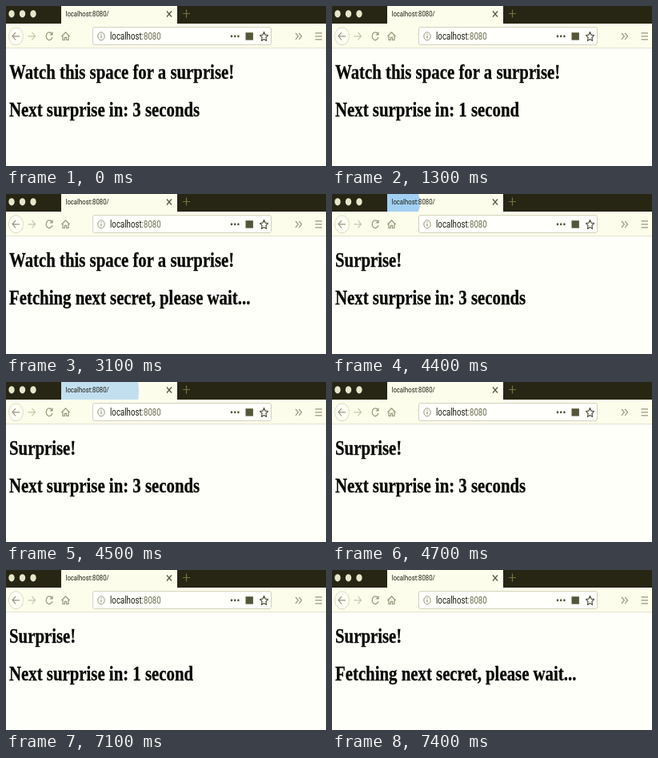
An HTML page for the animation above (8 s loop, 400 by 200 pixels).

```html
<!DOCTYPE html>
<html lang="en">
<head>
<meta charset="utf-8">
<title>Surprise countdown</title>
<style>
html, body { margin: 0; width: 100%; height: 100%; overflow: hidden; background: #fffff9; }
svg { display: block; width: 400px; height: 200px; }
.head { font: bold 32px "Liberation Serif", serif; fill: #050503; stroke: #050503; stroke-width: .4; }
.ui { font-family: Roboto, sans-serif; fill: #1c1c12; }
.port { fill: #6c6c50; }
.line { fill: none; stroke-width: 1.2; }
.dark { stroke: #55553f; }
.mid { stroke: #96967a; }
.pale { stroke: #c6c6a8; }

.step { visibility: hidden; animation: 8s step-end infinite; }
.watch { animation-name: watch; }
.found { animation-name: found; }
.three { animation-name: three; }
.two { animation-name: two; }
.one { animation-name: one; }
.fetch { animation-name: fetch; }
.burst { animation-name: burst; fill: #0a84ff; transform: translate(78px, 11px); }

@keyframes watch { 0% { visibility: visible } 55%, 100% { visibility: hidden } }
@keyframes found { 0% { visibility: hidden } 55%, 100% { visibility: visible } }
@keyframes three {
  0%, 55% { visibility: visible }
  3.75%, 66.25%, 100% { visibility: hidden }
}
@keyframes two {
  0%, 16.25%, 78.75%, 100% { visibility: hidden }
  3.75%, 66.25% { visibility: visible }
}
@keyframes one {
  0%, 28.75%, 91.25%, 100% { visibility: hidden }
  16.25%, 78.75% { visibility: visible }
}
@keyframes fetch {
  0%, 55% { visibility: hidden }
  28.75%, 91.25%, 100% { visibility: visible }
}
/* loading flash spreading through the tab */
@keyframes burst {
  0% { visibility: hidden }
  55% { visibility: visible; opacity: .37; transform: translate(78px, 11px) scale(32) }
  56.25% { visibility: visible; opacity: .24; transform: translate(78px, 11px) scale(88) }
  57.5% { visibility: visible; opacity: .09; transform: translate(78px, 11px) scale(126) }
  58.75%, 100% { visibility: hidden }
}
</style>
</head>
<body>
<svg viewBox="0 0 400 200">
  <defs>
    <clipPath id="tab"><rect x="69" width="145" height="22"/></clipPath>
  </defs>

  <!-- tab strip -->
  <rect width="400" height="200" fill="#fffff9"/>
  <rect width="400" height="22" fill="#272514"/>
  <rect y="22" width="400" height="31" fill="#fdfdec"/>
  <rect y="52" width="400" height="1" fill="#e3e3cc"/>
  <g fill="#e6e6cb">
    <ellipse cx="7" cy="9.8" rx="3.7" ry="4.6"/>
    <ellipse cx="20.5" cy="9.8" rx="3.7" ry="4.6"/>
    <ellipse cx="34" cy="9.8" rx="3.7" ry="4.6"/>
  </g>
  <rect x="69" width="145" height="22" fill="#fdfdec"/>
  <g clip-path="url(#tab)"><circle class="step burst" r="1"/></g>
  <text class="ui" font-size="12" transform="translate(74.5 13.4) scale(.647 .805)">localhost:8080/</text>
  <path class="line dark" d="M201 6.5l6 7m0-7l-6 7"/>
  <path class="line" stroke="#77743c" d="M221 9.5h9m-4.5-5v10"/>

  <!-- toolbar -->
  <ellipse cx="12.5" cy="37.8" rx="9" ry="11" fill="#fffff6" stroke="#dadac2"/>
  <path class="line mid" d="M17 37.8H8m4-4.6l-4 4.6 4 4.6"/>
  <path class="line pale" d="M27.5 37.8h9m-4-4.6l4 4.6-4 4.6"/>
  <path class="line mid" d="M57.3 34.7a4 4.8 0 1 0 .7 4.4M58 32.4v3.4h-3.2"/>
  <path class="line mid" d="M69.5 38l5-5.2 5 5.2M71 37.5v5h2.4v-3.2h2.2v3.2H78v-5"/>
  <rect x="108.5" y="26.5" width="223" height="22" rx="2.5" fill="#fffffc" stroke="#d3d3bc"/>
  <ellipse class="line mid" cx="119" cy="37.8" rx="4.2" ry="5" style="stroke-width:1"/>
  <path class="line mid" d="M119 37v3.6m0-5.9v1.2"/>
  <text class="ui" font-size="15" transform="translate(130 42) scale(.647 .805)">localhost<tspan class="port">:8080</tspan></text>
  <g fill="#55553a">
    <ellipse cx="282" cy="37.8" rx="1.3" ry="1.5"/>
    <ellipse cx="286.2" cy="37.8" rx="1.3" ry="1.5"/>
    <ellipse cx="290.4" cy="37.8" rx="1.3" ry="1.5"/>
    <rect x="299.5" y="33.2" width="9.4" height="9.4"/>
  </g>
  <path class="line dark" d="M322.5 32.4l1.5 3.7 3.5.5-2.6 2.9.7 3.9-3.1-1.9-3.1 1.9.7-3.9-2.6-2.9 3.5-.5z" stroke-linejoin="round"/>
  <path class="line mid" d="M362 33.8l3.3 4-3.3 4m4.2-8l3.3 4-3.3 4"/>
  <path class="line mid" d="M386.5 33.8h8.5m-8.5 4h8.5m-8.5 4h8.5"/>

  <!-- page -->
  <g class="head">
    <g transform="translate(4 90.9) scale(.651 .805)">
      <text class="step watch">Watch this space for a surprise!</text>
      <text class="step found">Surprise!</text>
    </g>
    <g transform="translate(4 137.9) scale(.651 .805)">
      <text class="step three">Next surprise in: 3 seconds</text>
      <text class="step two">Next surprise in: 2 seconds</text>
      <text class="step one">Next surprise in: 1 second</text>
      <text class="step fetch">Fetching next secret, please wait...</text>
    </g>
  </g>
</svg>
</body>
</html>
```
